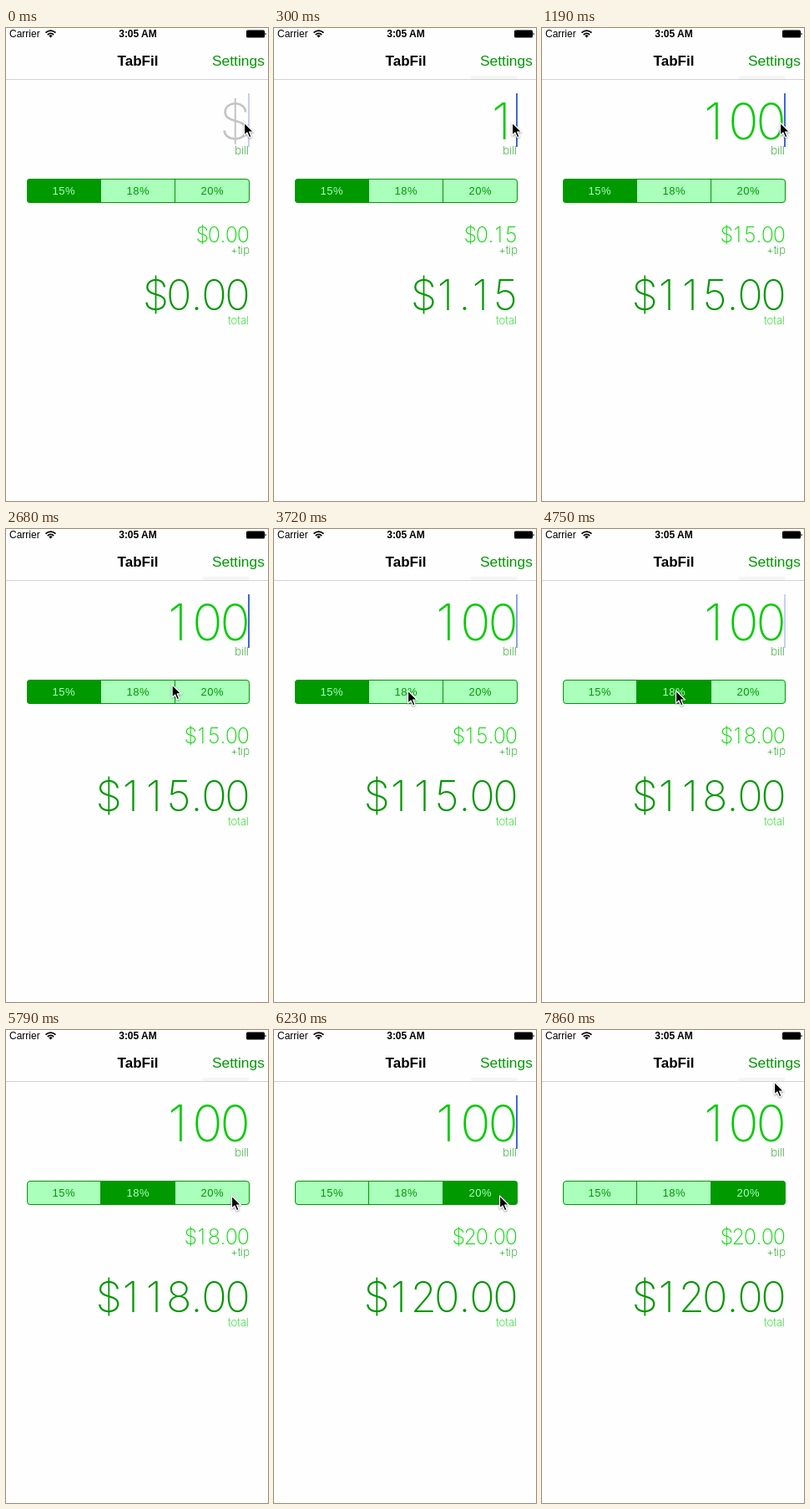
Recreate the animation shown at these times as an HTML page. Size 314 by 565 pixels, loop 8000 ms.

```html
<!DOCTYPE html>
<html lang="en">
<head>
<meta charset="utf-8">
<title>Tip calculator</title>
<style>
  html, body { margin: 0; width: 100%; height: 100%; overflow: hidden; background: #fff; }
  svg { display: block; width: 314px; height: 565px; font-family: "Liberation Sans", Arial, sans-serif; }
  .thin { font-family: Inter, Roboto, sans-serif; font-weight: 200; }
  .amount { text-anchor: middle; }
  .label { font-size: 13.2px; text-anchor: end; }
  .segment text { font-size: 13px; letter-spacing: .6px; text-anchor: middle; fill: #090; }
  .segment rect { fill: #afb; }
  .segment.on rect { fill: #090; }
  .segment.on text { fill: #afb; }
</style>
</head>
<body>
<svg viewBox="0 0 314 565">
  <clipPath id="rounded"><rect x="25" y="180" width="267" height="29" rx="4"/></clipPath>
  <rect width="314" height="565" fill="#fefefe"/>

  <!-- status bar -->
  <text x="4" y="11" font-size="12">Carrier</text>
  <g fill="none" stroke="#000" stroke-width="1.7">
    <path d="M47.5 5.6Q53.5 .6 59.5 5.6M49.8 8Q53.5 4.8 57.2 8"/>
    <path d="M51.3 9.2Q53.5 7.4 55.7 9.2L53.5 11.6Z" fill="#000" stroke="none"/>
  </g>
  <text x="158" y="11" font-size="12" font-weight="700" text-anchor="middle">3:05 AM</text>
  <rect x="288" y="2.5" width="22" height="9" rx="1.5"/>
  <path d="M310.5 5.2Q313 7 310.5 8.8Z"/>

  <!-- navigation bar -->
  <text x="158" y="45" font-size="17" font-weight="700" text-anchor="middle">TabFil</text>
  <text x="247" y="45" font-size="17.4" fill="#090">Settings</text>
  <rect id="smudge" x="236" y="57" width="55" height="4" fill="#f6f6f6"/>
  <rect y="61" width="314" height="1" fill="#d2d2d2"/>

  <text id="bill" class="thin amount" y="133"/>
  <text class="thin label" x="291" y="151" fill="#090">bill</text>
  <rect id="caret" x="290" y="78" width="2" height="64" fill="#3f66dd"/>

  <g id="segments" clip-path="url(#rounded)"></g>
  <rect x="25.5" y="180.5" width="266" height="28" rx="3.5" fill="none" stroke="#090"/>
  <path d="M113.5 180V209M202.5 180V209" stroke="#090"/>

  <text id="tip" class="thin amount" y="256" fill="#0d0"/>
  <text class="thin label" x="292" y="270" fill="#090">+tip</text>
  <text id="total" class="thin amount" y="336.5" fill="#090"/>
  <text class="thin label" x="291" y="354" fill="#0d0">total</text>

  <path id="pointer" d="M.5 0V15.2L4 12L6.5 17.8L9.1 16.7L6.6 11H11.5Z"
        stroke="#fff" stroke-width="1.2" stroke-linejoin="round"
        style="filter: drop-shadow(0 1px 1px #0006)"/>
</svg>
<script>
const LOOP = 8000;
const TICK = 148.2; // the picture advances in steps of this many ms
const RATES = [15, 18, 20];

// All times below are in ticks.
const KEY_PRESSES = [2, 6, 8];
const TAPS = [28, 41];
const BLINK_START = 12;
const BLINK_PERIOD = 6.5;
const HOME = { x: 285, y: 113 };
const MOVES = [
  { start: 14, end: 19, x: 195, y: 189 },
  { start: 21, end: 25, x: 160, y: 193 },
  { start: 34, end: 36, x: 270, y: 198 },
  { start: 50, end: 53, x: 278, y: 62 }
];

const $ = id => document.getElementById(id);
const clamp = value => Math.min(1, Math.max(0, value));
const easeOut = u => 1 - (1 - u) ** 2;
const countPast = (times, n) => times.filter(time => time <= n).length;
const money = value => "$" + value.toFixed(2);

function pointerAt(n) {
  return MOVES.reduce((from, move) => {
    const u = easeOut(clamp((n - move.start) / (move.end - move.start)));
    return { x: from.x + (move.x - from.x) * u, y: from.y + (move.y - from.y) * u };
  }, HOME);
}

// Fades out, stays away, fades back in; solid while typing.
function caretOpacity(n) {
  const typing = n >= KEY_PRESSES[0] && n < BLINK_START;
  if (typing) return 1;
  const phase = n < BLINK_START ? n + .5 : (n - BLINK_START) % BLINK_PERIOD;
  return phase < 2 ? clamp(.6 * (1 - phase)) : clamp(.6 * (phase - 2.3));
}

// Right-aligned figures, each centred in a cell of even pitch.
function setAmount(id, string, size) {
  const node = $(id);
  if (node.textContent === string) return;
  let edge = 291.4;
  const centres = [...string].reverse().map(char => {
    const width = size * (char === "." ? .278 : .556);
    edge -= width;
    return edge + width / 2 - (char === "1" ? size * .04 : 0);
  });
  node.setAttribute("font-size", size);
  node.setAttribute("x", centres.reverse().join(" "));
  node.textContent = string;
}

$("segments").innerHTML = RATES.map((rate, i) => `
  <g class="segment">
    <rect x="${25 + i * 89}" y="180" width="89" height="29"/>
    <text x="${69.3 + i * 89}" y="199">${rate}%</text>
  </g>`).join("");
const segments = document.querySelectorAll(".segment");

function draw(t) {
  const n = Math.floor(t / TICK);
  const typed = "100".slice(0, countPast(KEY_PRESSES, n));
  const selected = countPast(TAPS, n);
  const bill = Number(typed);
  const tip = bill * RATES[selected] / 100;
  const { x, y } = pointerAt(n);

  setAmount("bill", typed || "$", 60);
  setAmount("tip", money(tip), 25.2);
  setAmount("total", money(bill + tip), 50.4);
  $("bill").setAttribute("fill", typed ? "#0c0" : "#c4c4c4");
  $("smudge").setAttribute("opacity", typed ? 1 : 0);
  $("caret").setAttribute("opacity", caretOpacity(n));
  $("pointer").setAttribute("transform", `translate(${x} ${y})`);
  segments.forEach((node, i) => node.classList.toggle("on", i === selected));
}

const start = performance.now();
function frame() {
  draw((performance.now() - start) % LOOP);
  requestAnimationFrame(frame);
}
frame();
</script>
</body>
</html>
```
